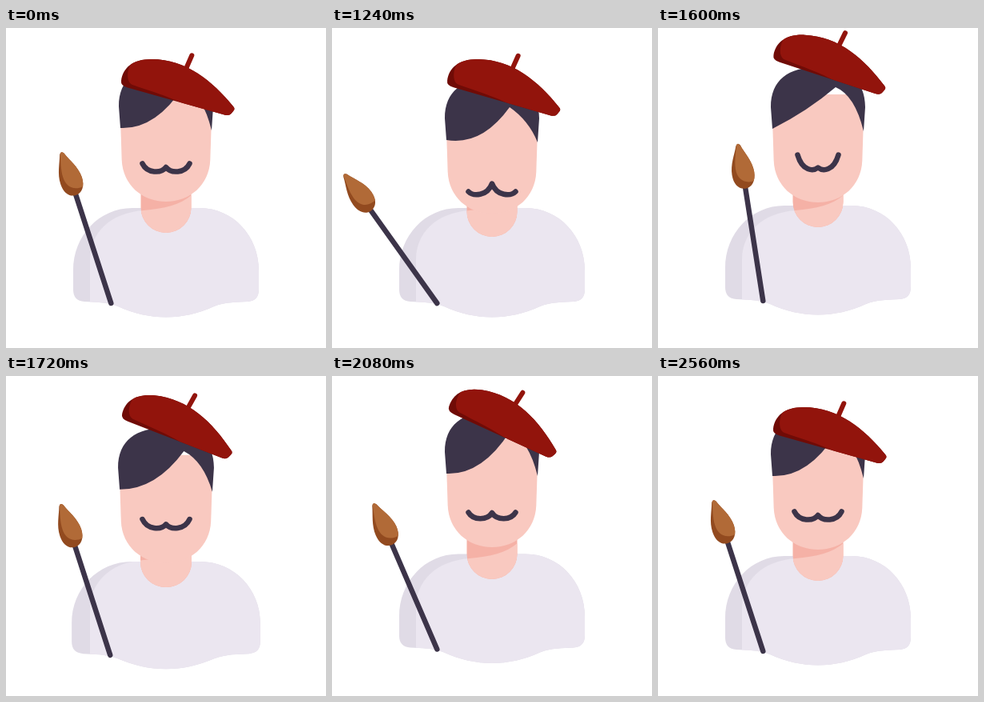
These frames come from a looping animation (400 px wide and 400 px high, 2.59 s). An HTML page with a canvas:

```html
<!DOCTYPE html>
<html lang="en">
<head>
<meta charset="utf-8">
<title>Painter</title>
<style>
  html, body { margin: 0; width: 100%; height: 100%; overflow: hidden; background: #fff; }
  canvas { display: block; width: 100vw; height: 100vh; }
</style>
</head>
<body>
<canvas></canvas>
<script>
const LOOP = 2590, START = 1030, STEP = 30;
const canvas = document.querySelector('canvas');
const ctx = canvas.getContext('2d');

const INK = '#3c3449', SKIN = '#f9c9c0', SKIN_DARK = '#f5b1a6';
const SHIRT = '#ebe6f0', SHIRT_DARK = '#e0dbe6';
const HAT = '#92140c', HAT_DARK = '#700b06';
const BRISTLE = '#b16a37', BRISTLE_DARK = '#924a1f';

// Key times and one track of values per moving part
const times =  [1000, 1030, 1120, 1240, 1400, 1555, 1600, 1820, 1870, 1940, 2080, 2150, 2280, 2450];
const tracks = {
  shirt:       [0, 4, 12, 0, -6, -4, -3, 13, 9, 0, -2.5, -1, 1.5, 0],
  neck:        [0, 4, 13, 5, -6, -8, -7, 18, 17, 6, -2, -1, 1, 0],
  head:        [0, 4, 20, 15, -5, -2, 1, 27, 28, 16, -3, -3.5, 1, 0],
  tips:        [0, 4, 30, 35, 4, -12, -11, 34, 44, 36, 1, -2, 1, 0],
  curl:        [4.5, 4.5, -3, -10, 2, 15, 16, -4, -6, -8, 0.5, 3, 5, 4.5],
  part:        [0, 1, 8, 11, 2, 0, 0, 10, 13, 12, 0, 0, 0, 0],
  hat:         [0, 0, 0, 0.3, -15, -31.5, -29, 1, 3, 2, -17, -23, -6, 0],
  tilt:        [0, 0, 0, 0.5, 3, 2, 2.5, 9, 11.2, 12, 9, 6, 2, 0],
  brush:       [18, 18.7, 26, 35.5, 20, 8.5, 8.9, 29, 33.9, 36, 23.3, 19, 17.6, 18]
};

const slope = (v, i) => (v[i + 1] - v[i]) / (times[i + 1] - times[i]);

function tangent(v, i) {
  if (i === 0 || i === v.length - 1) return 0;
  const a = slope(v, i - 1), b = slope(v, i);
  return a * b <= 0 ? 0 : 2 * a * b / (a + b);
}

// Monotone cubic interpolation
function sample(v, t) {
  const last = times.length - 1;
  if (t <= times[0]) return v[0];
  if (t >= times[last]) return v[last];
  let i = 0;
  while (t > times[i + 1]) i++;
  const h = times[i + 1] - times[i], u = (t - times[i]) / h, w = 1 - u;
  return v[i] * (1 + 2 * u) * w * w + v[i + 1] * u * u * (3 - 2 * u)
    + h * u * w * (tangent(v, i) * w - tangent(v, i + 1) * u);
}

const path = d => new Path2D(d);
const shapes = {
  shirt: path('M84 303 V327 Q84 341 98 342 C112 343 125 342 140 348 C180 366 220 366 260 348 ' +
    'C275 342 288 343 302 342 Q316 341 316 327 V303 C316 260 284 225 242 225 H158 C116 225 84 260 84 303Z'),
  neck: path('M168.5 185 V224.5 A31.5 31.5 0 0 0 231.5 224.5 V185Z'),
  lit: path('M105 420 V290 C105 256 130 231 172 228 C200 226 222 220 236 205 H420 V420Z'),
  face: path('M143.3 122 L150 82 H250 L256.7 122 L255.3 165 C254 196 230 217 200 217 C170 217 146 196 144.7 165Z'),
  hat: path('M152 74.5 Q143 72 144 66 C146 50 158 39 182 39 C225 39 258 66 284 98 ' +
    'Q287 101 284 104 L281.5 107 Q279 110 273 108.5Z'),
  hatLit: path('M163 36 C150 48 149 67 158 71 C178 78 205 86 222 95 L300 125 V20Z'),
  bristle: path('M-3.6 -196.5 Q-1 -201 2 -196.5 C5 -187 14 -175 14 -161 C14 -149 8 -142 0 -142 ' +
    'C-8 -142 -14 -149 -14 -161 C-14 -175 -7 -186 -3.6 -196.5Z'),
  bristleLit: path('M-2 -200 C-5 -188 -8.5 -178 -8.5 -168 C-8.5 -155 0 -147 14 -150 L20 -200Z')
};

function fill(shape, color) {
  ctx.fillStyle = color;
  ctx.fill(shape);
}

function stroke(shape, width) {
  ctx.lineWidth = width;
  ctx.stroke(shape);
}

function group(draw) {
  ctx.save();
  draw();
  ctx.restore();
}

function widen(k) {
  ctx.translate(200, 0);
  ctx.scale(k, 1);
  ctx.translate(-200, 0);
}

// Body part with a fixed shadow edge falling across it
function shaded(shape, dark, light, place, drop) {
  const base = ctx.getTransform();
  group(() => {
    place();
    fill(shape, dark);
    ctx.clip(shape);
    ctx.setTransform(base);
    ctx.translate(0, drop);
    fill(shapes.lit, light);
  });
}

function drawHead(p) {
  fill(shapes.face, SKIN);
  const peak = 73 + p.part;
  const sag = 14 - Math.max(0, p.curl - 4.5) * 1.05;
  const left = (125 + peak) / 2 + 2 * sag;
  const right = (128 + peak) / 2 - 17.5 + 1.1 * p.part;
  fill(path(`M143 125 L141 98 C141 64 163 48 200 48 C237 48 259 64 259 98 L257 128
    Q246 ${right} 222 ${peak} Q187 ${left} 143 125Z`), INK);
}

function drawMoustache(p) {
  const y = 169.5 + p.tips, m = p.curl;
  const x = 29.5 - Math.max(0, m - 5) * 0.36;
  const low = 7.5 + 0.5 * m + 0.008 * m * m;
  const c = y + (low - 0.125 * m) / 0.75;
  stroke(path(`M${200 - x} ${y} C${206 - x} ${c} 194 ${c} 200 ${y + m}
    C206 ${c} ${194 + x} ${c} ${200 + x} ${y}`), 6.5);
}

function drawHat(p) {
  ctx.translate(214 - 0.17 * p.tilt, 84 + p.hat);
  ctx.rotate(p.tilt * Math.PI / 180);
  ctx.translate(-214, -84);
  ctx.strokeStyle = HAT;
  stroke(path('M225 51 L232.3 34.3'), 6);
  fill(shapes.hat, HAT_DARK);
  ctx.clip(shapes.hat);
  fill(shapes.hatLit, HAT);
}

function drawBrush(p, k, drop) {
  ctx.translate(200 - 68.7 * k, 344 + drop);
  ctx.rotate(-p.brush * Math.PI / 180);
  stroke(path('M0 0 V-143'), 6.5);
  fill(shapes.bristle, BRISTLE_DARK);
  ctx.clip(shapes.bristle);
  fill(shapes.bristleLit, BRISTLE);
}

function draw(t) {
  const p = {};
  for (const name in tracks) p[name] = sample(tracks[name], t);
  const squash = Math.max(0, p.shirt);
  const k = 1 + squash * 0.0023;
  const drop = p.shirt - 0.3 * squash;

  ctx.fillStyle = '#fff';
  ctx.fillRect(0, 0, 400, 400);
  ctx.lineCap = ctx.lineJoin = 'round';
  ctx.strokeStyle = INK;

  shaded(shapes.shirt, SHIRT_DARK, SHIRT, () => {
    widen(k);
    ctx.translate(0, 225 + p.shirt);
    ctx.scale(1, 1 - 0.3 * squash / 136);
    ctx.translate(0, -225);
  }, squash * 0.3);
  shaded(shapes.neck, SKIN_DARK, SKIN, () => {
    widen(k);
    ctx.translate(0, p.neck);
  }, squash * 0.3);
  group(() => {
    widen(k);
    ctx.translate(0, p.head);
    drawHead(p);
  });
  group(() => {
    widen(k);
    drawMoustache(p);
  });
  group(() => drawHat(p));
  group(() => drawBrush(p, k, drop));
}

function tick() {
  const w = Math.round(innerWidth * devicePixelRatio);
  const h = Math.round(innerHeight * devicePixelRatio);
  if (canvas.width !== w || canvas.height !== h) {
    canvas.width = w;
    canvas.height = h;
  }
  ctx.setTransform(w / 400, 0, 0, h / 400, 0, 0);
  const t = performance.now() % LOOP;
  draw(t < START ? 0 : START + Math.floor((t - START) / STEP) * STEP);
  requestAnimationFrame(tick);
}
tick();
</script>
</body>
</html>
```
